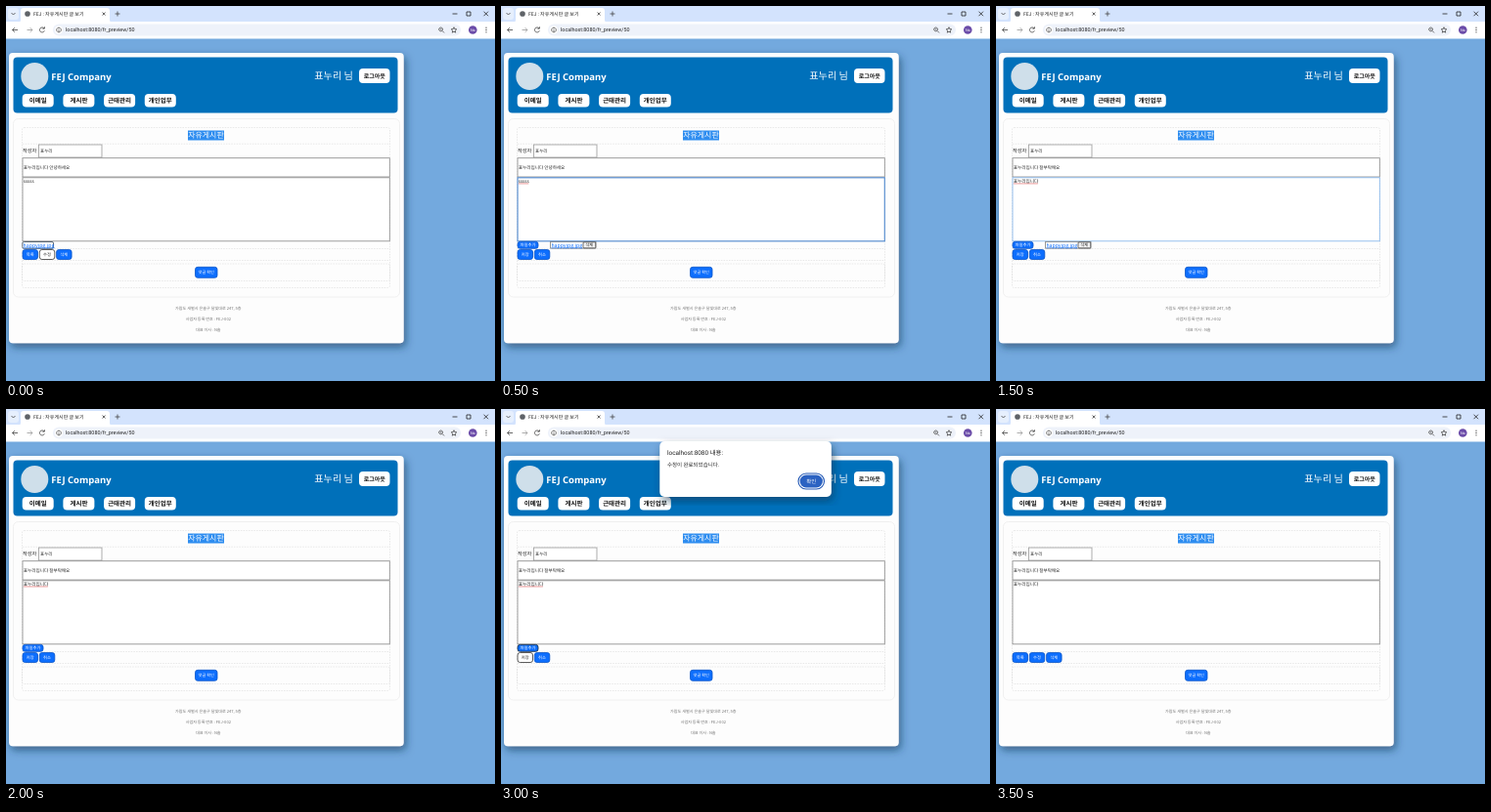
Write an HTML page that moves like this. It is 500x384 px and loops after 4 s.

```html
<!DOCTYPE html>
<html>
<head>
<meta charset="utf-8">
<title>Board post edit</title>
<style>
html, body { margin: 0; width: 100%; height: 100%; overflow: hidden; background: #73a9de; }
svg { display: block; width: 500px; height: 384px; }
text { font-family: "Noto Sans CJK KR", "Noto Sans CJK", "Noto Sans", sans-serif; text-rendering: geometricPrecision; }
.ui { font-family: Roboto, "Noto Sans CJK KR", sans-serif; }
.brand { font-family: "Noto Sans", sans-serif; }
.icon { fill: none; stroke: #444; stroke-width: .8; }
.dash { fill: none; stroke: #dadada; stroke-width: .6; stroke-dasharray: 1.5 1.2; }
</style>
</head>
<body>
<svg viewBox="0 0 500 384">
  <defs>
    <filter id="shadow" x="-10%" y="-10%" width="120%" height="125%">
      <feDropShadow dx="2" dy="4" stdDeviation="4" flood-color="#12304f" flood-opacity=".6"/>
    </filter>
  </defs>
  <g id="browser"></g>
  <g id="page"></g>
  <g id="post"></g>
</svg>
<script>
const STEP = 500, STEPS = 8;
const USER = '표누리', BRAND = 'FEJ';
const BLUE = '#0d6efd', INK = '#222';

const rect = (x, y, w, h, fill, { r = 0, stroke = 'none', sw = .8, extra = '' } = {}) =>
  `<rect x="${x}" y="${y}" width="${w}" height="${h}" rx="${r}" fill="${fill}" stroke="${stroke}" stroke-width="${sw}" ${extra}/>`;
const text = (x, y, size, str, { fill = INK, weight = 400, anchor = 'start', cls = '', extra = '' } = {}) =>
  `<text x="${x}" y="${y}" font-size="${size}" fill="${fill}" font-weight="${weight}" text-anchor="${anchor}" class="${cls}" ${extra}>${str}</text>`;
const circle = (x, y, r, fill) => `<circle cx="${x}" cy="${y}" r="${r}" fill="${fill}"/>`;
const icon = (d, stroke = '#444') => `<path class="icon" style="stroke:${stroke}" d="${d}"/>`;
const dashLine = y => `<path class="dash" d="M17 ${y}H392.5"/>`;

function button(x, y, w, h, label, { size = 4.3, pressed = false, r = 2.5, edge = '#0a55c8' } = {}) {
  return rect(x, y, w, h, pressed ? '#fff' : BLUE, { r, stroke: pressed ? '#333' : edge }) +
    text(x + w / 2, y + h / 2 + size * .36, size, label,
      { fill: pressed ? INK : '#fff', weight: 500, anchor: 'middle' });
}

function whiteButton(x, y, w, h, label, size) {
  return rect(x, y, w, h, '#fff', { r: 4 }) +
    text(x + w / 2, y + h / 2 + size * .36, size, label, { fill: '#111', weight: 700, anchor: 'middle' });
}

function drawBrowser() {
  return rect(0, 0, 500, 17, '#d3e3fd') +
    rect(2, 2, 11, 12, '#e6effd', { r: 3 }) + icon('M5.5 7l2 2l2-2') +
    '<path fill="#fff" d="M12 17q3 0 3-3V5q0-3 3-3H103q3 0 3 3V14q0 3 3 3Z"/>' +
    rect(0, 16, 500, 17.5, '#fff') +
    circle(22, 8, 2.8, '#5f6368') +
    text(28, 10, 5.05, `${BRAND} : 자유게시판 글 보기`) +
    icon('M98.5 6.5l3 3m0-3l-3 3M114 5.5v5m-2.5-2.5h5') +
    icon('M456.5 8h5M471 6h4v4h-4ZM488.5 5.7l4.5 4.5m0-4.5l-4.5 4.5', '#222') +
    icon('M12 24.5H6.5m2.3-2.3l-2.3 2.3l2.3 2.3') +
    icon('M21.5 24.5H27m-2.3-2.3l2.3 2.3l-2.3 2.3', '#999') +
    icon('M39 23a2.5 2.5 0 1 0 .3 2.3M39.4 21.2v2h-2') +
    rect(48, 18.5, 417, 12, '#eef2fa', { r: 6 }) +
    circle(54, 24.5, 4, '#fff') + icon('M54 22.2a2.3 2.3 0 1 0 .01 0M54 24v1.6') +
    text(61, 26.4, 5.4, 'localhost:8080/fr_preview/50', { cls: 'ui' }) +
    icon('M444.6 22a1.9 1.9 0 1 0 .01 0M446 25.4l2 2M443.7 23.9h1.8') +
    icon('M458 21.7l.8 1.9l2 .2l-1.5 1.4l.4 2l-1.7-1l-1.7 1l.4-2l-1.5-1.4l2-.2Z') +
    circle(477.3, 24.5, 4.3, '#6a4ba8') +
    text(477.3, 26, 3.8, 'Na', { fill: '#fff', anchor: 'middle', cls: 'ui' }) +
    [22.2, 24.5, 26.8].map(y => circle(491, y, .65, '#444')).join('');
}

function drawPage() {
  const nav = ['이메일', '게시판', '근태관리', '개인업무'];
  const footer = ['가람도 새벌시 은솔구 달빛대로 247, 5층', `사업자 등록 번호 : ${BRAND}-002`, '대표 이사 : N솔'];
  return rect(3, 48, 403.7, 297.3, '#fdfdfd', { r: 4, extra: 'filter="url(#shadow)"' }) +
    rect(7.5, 52.5, 393, 57, '#0070ba', { r: 4 }) +
    circle(29.3, 72, 14, '#cfdfea') +
    text(46.3, 75.7, 9.5, `${BRAND} Company`, { fill: '#fff', weight: 700, cls: 'brand' }) +
    text(355, 75.4, 10.2, `${USER} 님`, { fill: '#fff', weight: 500, anchor: 'end' }) +
    whiteButton(361, 64, 31.5, 15, '로그아웃', 6) +
    nav.map((label, i) => whiteButton(16.7 + i * 41.7, 90, 32, 13.5, label, 6.5)).join('') +
    rect(7.5, 115.5, 395, 182.5, 'none', { r: 5, stroke: '#ececec' }) +
    rect(16.5, 124.5, 376, 164, 'none', { r: 2, extra: 'class="dash"' }) +
    rect(186, 127.5, 37, 10, '#2e8df0') +
    text(204.5, 135.4, 7.9, '자유게시판', { fill: '#fff', weight: 500, anchor: 'middle' }) +
    dashLine(141.2) +
    text(17, 149.7, 5.2, '작성자') +
    rect(33.5, 142, 64.5, 13, '#fff', { stroke: '#999' }) +
    text(35, 150, 4.5, USER) +
    dashLine(248.5) + dashLine(260.5) +
    rect(16.5, 264, 376, 17.5, '#fafafa', { r: 2, extra: 'class="dash"' }) +
    button(193.5, 267.3, 22.5, 11, '댓글 확인', { size: 4.2 }) +
    footer.map((line, i) => text(206.8, 311.3 + i * 10.8, 4.1, line, { fill: '#777', anchor: 'middle' })).join('');
}

function fileLink(x) {
  return text(x, 246.6, 5.2, 'happyjpg.jpg', { fill: BLUE, extra: 'text-decoration="underline"' });
}

function drawFiles(step) {
  if (step === 0) return rect(16.8, 241.5, 31.7, 6.8, '#fff', { r: 1.5, stroke: '#345' }) + fileLink(17.6);
  if (step === 7) return '';
  const add = button(17, 241.3, 21, 7, '파일추가', { edge: step > 4 ? '#123' : '#0a55c8' });
  if (step > 3) return add;
  return add + rect(50.7, 241.5, 46.3, 6.6, '#fff', { stroke: '#555', sw: .6 }) + fileLink(51.4) +
    rect(84, 241.8, 12.7, 6, '#f2f2f2', { r: 1, stroke: '#333', sw: .7 }) +
    text(90.3, 246.3, 4.2, '삭제', { anchor: 'middle' });
}

function drawActions(step) {
  const viewing = step === 0 || step === 7;
  const labels = viewing ? ['목록', '수정', '삭제'] : ['저장', '취소'];
  const pressed = step === 0 ? 1 : step === 5 || step === 6 ? 0 : -1;
  return labels.map((label, i) =>
    button(17 + i * 17.3, 249.5, 15.5, 10, label, { pressed: i === pressed })).join('');
}

function drawDialog() {
  return rect(162.3, 33, 175.5, 57, '#fff', { r: 5, extra: 'filter="url(#shadow)"' }) +
    text(170, 47, 6.4, 'localhost:8080 내용:', { cls: 'ui' }) +
    text(170, 59, 5.5, '수정이 완료되었습니다.') +
    rect(304, 66, 26.5, 16, '#fff', { r: 8, stroke: '#2459b5', sw: 1.1 }) +
    rect(305.6, 67.6, 23.3, 12.8, '#2b62c2', { r: 6.4 }) +
    text(317.3, 76, 5.4, '확인', { fill: '#fff', anchor: 'middle' });
}

function drawPost(step) {
  const greeting = step < 2 ? '안녕하세요' : '잘부탁해요';
  const edited = step > 2;
  const editing = step > 0 && step < 7;
  const bodyEdge = { 1: '#5a8fd0', 3: '#7fb2ea' }[step] || '#888';
  return rect(17, 155.7, 375.3, 19.3, '#fff', { stroke: step === 2 ? '#7fb2ea' : '#888' }) +
    text(17.8, 167.2, 4.6, `${USER}입니다 ${greeting}`) +
    rect(17, 175.8, 375.3, 65, '#fff', { stroke: bodyEdge, sw: step === 1 ? 1.2 : .8 }) +
    text(17.8, 180.7, 4.6, edited ? `${USER}입니다` : 'sssss') +
    (editing ? `<path d="M17.8 181.9h${edited ? 25 : 10.5}" stroke="#e05a5a" stroke-width=".6"/>` : '') +
    drawFiles(step) + drawActions(step) +
    (step === 6 ? drawDialog() : '');
}

const layer = id => document.getElementById(id);
layer('browser').innerHTML = drawBrowser();
layer('page').innerHTML = drawPage();

let shown = -1;
function tick() {
  const step = Math.floor(performance.now() / STEP) % STEPS;
  if (step !== shown) layer('post').innerHTML = drawPost(shown = step);
  requestAnimationFrame(tick);
}
tick();
</script>
</body>
</html>
```
